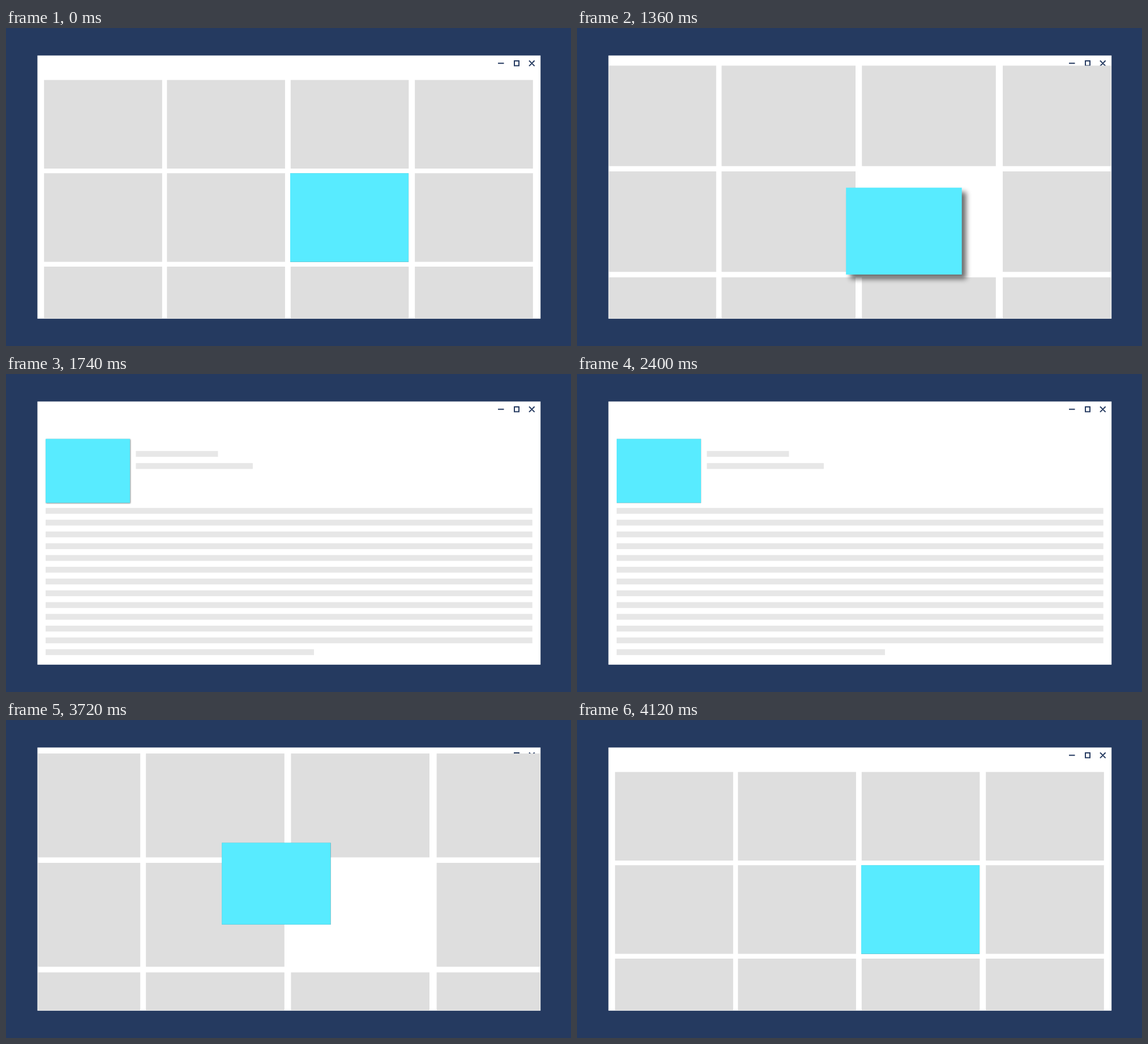
An HTML page that plays this animation: 998x561 px, repeating every 4.32 s.

```html
<!DOCTYPE html>
<html lang="en">
<head>
<meta charset="utf-8">
<title>Tile to page transition</title>
<style>
  html, body { margin: 0; width: 100%; height: 100%; overflow: hidden; background: #253a60; }
  svg { display: block; width: 100vw; height: 100vh; }
</style>
</head>
<body>
<svg viewBox="0 0 998 561">
  <defs>
    <clipPath id="inside"><rect x="56.4" y="48.5" width="887" height="464"/></clipPath>
    <filter id="soft" x="-20%" y="-20%" width="140%" height="140%">
      <feGaussianBlur id="blur" stdDeviation="0.6"/>
    </filter>
    <path id="route" d="M606.5 334.4C553 432 300 240 144.5 170.9"/>
  </defs>
  <rect width="998" height="561" fill="#253a60"/>
  <rect x="55.5" y="48.5" width="888.7" height="464.3" fill="#fff"/>
  <g fill="none" stroke="#253a60" stroke-width="2">
    <path d="M869 62.3h10.5M898 58h8v8.5h-8zM924 57.5l9.6 9.6M933.6 57.5l-9.6 9.6"/>
  </g>
  <g clip-path="url(#inside)">
    <g id="grid" fill="#dedede"></g>
    <g id="page" fill="#e7e7e7"></g>
  </g>
  <rect id="shadow" filter="url(#soft)" fill="#000"/>
  <rect id="tile" fill="#58ebff"/>
</svg>
<script>
const LOOP = 4320, STEP = 20, STEPS = 28;
const OPEN_AT = 1180, CLOSE_AT = 3560;
const OPEN_CUT = 13, CLOSE_CUT = 5;
const START = { x: 606.5, y: 334.4 }, END = { x: 144.5, y: 170.9 };
const el = id => document.getElementById(id);
const [grid, page, shadow, tile, blur, route] =
  ['grid', 'page', 'shadow', 'tile', 'blur', 'route'].map(el);
const routeLength = route.getTotalLength();

const clamp = v => Math.min(1, Math.max(0, v));
const mix = (a, b, p) => a + (b - a) * p;

function setAttrs(node, attrs) {
  for (const name in attrs) node.setAttribute(name, attrs[name]);
}

function addRect(parent, x, y, width, height) {
  const rect = document.createElementNS('http://www.w3.org/2000/svg', 'rect');
  setAttrs(rect, { x, y, width, height });
  parent.append(rect);
}

function bezierEase(x1, y1, x2, y2) {
  const at = (a, b, u) => 3 * (1 - u) * (1 - u) * u * a + 3 * (1 - u) * u * u * b + u * u * u;
  return x => {
    if (x <= 0 || x >= 1) return clamp(x);
    let low = 0, high = 1;
    for (let i = 0; i < 30; i++) {
      const mid = (low + high) / 2;
      if (at(x1, x2, mid) < x) low = mid; else high = mid;
    }
    return at(y1, y2, low);
  };
}
const openEase = bezierEase(0.857, 0, 0.262, 1);
const closeEase = bezierEase(0.15, 0.13, 0, 1);

function build() {
  [67.2, 284.3, 502.8, 722.2].forEach((x, col) =>
    [91.7, 256.2, 421].forEach((y, row) => {
      // The moving tile fills this gap.
      if (col !== 2 || row !== 1) addRect(grid, x, y, 208.6, 156.3);
    }));
  addRect(page, 229.4, 135.8, 145, 10.3);
  addRect(page, 229.4, 157.2, 206.5, 10.3);
  for (let i = 0; i < 13; i++)
    addRect(page, 70, 236.3 + 20.77 * i, i < 12 ? 859.7 : 474, 10.3);
}

function zoom(layer, scale, visible) {
  setAttrs(layer, {
    transform: `translate(499.5 280.5) scale(${scale}) translate(-499.5 -280.5)`,
    visibility: visible ? 'visible' : 'hidden'
  });
}

function placeTile(center, opened, lift) {
  const width = mix(209, 149, opened), height = mix(156.5, 112.8, opened);
  const x = center.x - width / 2, y = center.y - height / 2;
  const offset = 0.2 + 7.5 * lift;
  setAttrs(tile, { x, y, width, height });
  setAttrs(shadow, { x: x + offset, y: y + offset, width, height, opacity: 0.5 + 0.08 * lift });
  blur.setAttribute('stdDeviation', 0.6 + 4.4 * lift);
}

function drawOpening(k) {
  const opened = openEase(k / STEPS);
  const lift = k < 9 ? clamp(k / 8) : clamp(1 - ((k - 9) / 20) ** 1.6);
  const rest = clamp((27 - k) / (27 - OPEN_CUT));
  zoom(grid, 1 + 0.0149 * k, k < OPEN_CUT);
  zoom(page, 1 - 0.086 * rest * rest, k >= OPEN_CUT);
  placeTile(route.getPointAtLength(opened * routeLength), opened, lift);
}

function drawClosing(k) {
  const closed = closeEase(k / STEPS);
  zoom(page, 1 - 0.0012 * k * k, k < CLOSE_CUT);
  zoom(grid, 1 + 0.2 * clamp((27 - k) / (27 - CLOSE_CUT)), k >= CLOSE_CUT);
  placeTile({ x: mix(END.x, START.x, closed), y: mix(END.y, START.y, closed) }, 1 - closed, 0);
}

function draw(time) {
  const now = Math.floor((time % LOOP) / STEP + 0.01) * STEP;
  if (now < CLOSE_AT) drawOpening(Math.max(0, (now - OPEN_AT) / STEP));
  else drawClosing((now - CLOSE_AT) / STEP);
}

build();
draw(0);
const began = performance.now();
function tick(now) {
  draw(Math.max(0, now - began));
  requestAnimationFrame(tick);
}
requestAnimationFrame(tick);
</script>
</body>
</html>
```
